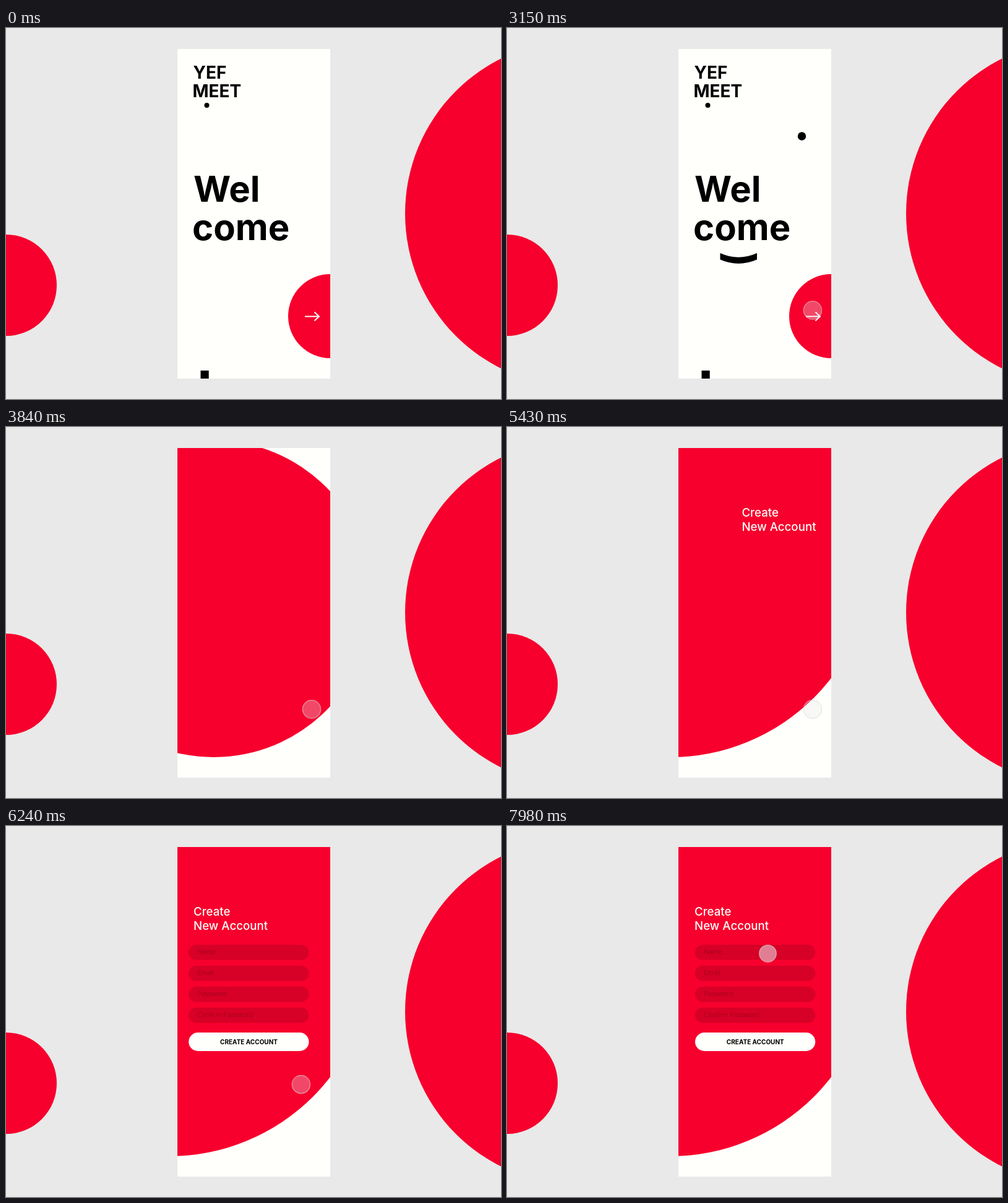
Animation, 800 px wide and 600 px high, one loop 8000 ms. Source, as an HTML page:

```html
<!DOCTYPE html>
<html lang="en">
<head>
<meta charset="utf-8">
<title>Welcome to sign-up</title>
<style>
  html, body { margin: 0; width: 100%; height: 100%; overflow: hidden; background: #e9e9e9; }
  svg { display: block; width: 100vw; height: 100vh; }
  text { font-family: Inter, sans-serif; }
  .red { fill: #f7002d; }
  .white { fill: #fffffc; }
  .logo { font-size: 28px; font-weight: 700; }
  .hello { font-size: 58px; font-weight: 700; }
  .title { font-size: 18.7px; font-weight: 500; }
  .label { font-family: "Open Sans", sans-serif; font-size: 10.9px; font-weight: 300; fill: #8a0019; }
  .action { font-size: 10px; font-weight: 700; text-anchor: middle; }
</style>
</head>
<body>
<svg viewBox="0 0 800 600">
  <defs>
    <clipPath id="screen"><rect x="277" y="34" width="247" height="533"/></clipPath>
    <clipPath id="reveal"><rect id="wipe" x="344" y="355" width="0" height="35"/></clipPath>
  </defs>
  <rect width="800" height="600" fill="#e9e9e9"/>
  <circle class="red" cx="0" cy="416" r="82"/>
  <circle class="red" cx="925" cy="300" r="280"/>
  <g clip-path="url(#screen)">
    <rect class="white" x="277" y="34" width="247" height="533"/>
    <text class="logo" x="302.5" y="82">YEF</text>
    <text class="logo" x="301.5" y="112">MEET</text>
    <circle cx="324.5" cy="125" r="4"/>
    <text class="hello" x="303" y="281">Wel</text>
    <text class="hello" x="301" y="343">come</text>
    <circle id="dot" cx="476.5" cy="175" r="0"/>
    <path clip-path="url(#reveal)" d="M344.5 364 Q374 377.5 404 364 V374.5 Q374 387.5 344.5 374.5Z"/>
    <rect id="peek" x="314.5" y="554" width="13.2" height="14"/>
    <circle id="disc" class="red"/>
    <path id="arrow" d="M483 466.5H506M498.5 459.5L506 466.5L498.5 473.5" fill="none" stroke="#fffffc" stroke-width="2"/>
    <g id="title" class="title white">
      <text x="303" y="144.7">Create</text>
      <text x="303" y="168.2">New Account</text>
    </g>
    <g id="form">
      <g id="fields"></g>
      <rect class="white" x="304" y="334" width="194.3" height="30" rx="15"/>
      <text class="action" x="401.3" y="353">CREATE ACCOUNT</text>
    </g>
    <circle id="touch"/>
  </g>
</svg>
<script>
const LOOP = 8000;
const $ = id => document.getElementById(id);
const set = (id, attrs) => {
  for (const key in attrs) $(id).setAttribute(key, attrs[key]);
};

$('fields').innerHTML = ['Name', 'Email', 'Password', 'Confirm Password'].map((label, i) => {
  const y = 192 + i * 33.9;
  return `<rect x="304" y="${y}" width="194.3" height="24.6" rx="12.3" fill="#d70027"/>
    <text class="label" x="318.3" y="${y + 15.4}">${label}</text>`;
}).join('');

const phase = (t, from, to) => Math.min(1, Math.max(0, (t - from) / (to - from)));
const mix = (a, b, p) => a + (b - a) * p;
const sine = p => (1 - Math.cos(Math.PI * p)) / 2;
const outQuad = p => p * (2 - p);

// cubic-bezier(.25, .1, .25, 1), solved by bisection
function ease(p) {
  const curve = (a, b, s) => 3 * a * s * (1 - s) ** 2 + 3 * b * s * s * (1 - s) + s ** 3;
  let lo = 0, hi = 1;
  for (let i = 0; i < 24; i++) {
    const mid = (lo + hi) / 2;
    if (curve(.25, .25, mid) < p) lo = mid; else hi = mid;
  }
  return curve(.1, 1, hi);
}

// Enters from the right, overshoots by 9 and settles
function slideIn(t, start) {
  const peak = start + 450;
  return t < peak
    ? mix(230, -9, outQuad(phase(t, start, peak)))
    : mix(-9, 0, sine(phase(t, peak, peak + 300)));
}

function drawWelcome(t) {
  const p = sine(phase(t, 0, 1500));
  set('wipe', { width: 60 * p });
  set('dot', { r: 6.7 * p });
  const nudge = 6 * Math.sin(Math.PI * sine(phase(t, 0, 810)));
  set('arrow', {
    transform: `translate(${nudge} 0)`,
    opacity: 1 - phase(t, 3600, 3740)
  });
  set('peek', { y: mix(554, 568, outQuad(phase(t, 3600, 3800))) });
}

// Grows out of a fixed lower right corner
function drawDisc(t) {
  const r = mix(68, 328, ease(phase(t, 3600, 4160)));
  set('disc', { cx: 592 - r, cy: 534 - r, r });
}

function drawForm(t) {
  set('title', { transform: `translate(${slideIn(t, 5250)} 0)` });
  set('form', { transform: `translate(${slideIn(t, 5760)} 0)` });
}

function drawTouch(t) {
  const s = sine(phase(t, 5900, 7080));
  const along = bend => 2 * s * (1 - s) * bend + s * s;
  const tap = sine(phase(t, 3380, 3500)) - sine(phase(t, 3520, 3660));
  const press = Math.max(tap, sine(phase(t, 7680, 7900)));
  set('touch', {
    cx: mix(494, 421.5, along(.64)),
    cy: mix(456.5, 206.3, along(.377)),
    r: mix(14.6, 13.8, press),
    fill: `rgba(232,232,236,${mix(.31, .55, press)})`,
    stroke: 'rgba(215,215,215,.65)',
    'stroke-width': 1.2,
    opacity: sine(phase(t, 2800, 3100))
  });
}

const began = performance.now();
function draw() {
  const t = (performance.now() - began) % LOOP;
  drawWelcome(t);
  drawDisc(t);
  drawForm(t);
  drawTouch(t);
  requestAnimationFrame(draw);
}
draw();
</script>
</body>
</html>
```
